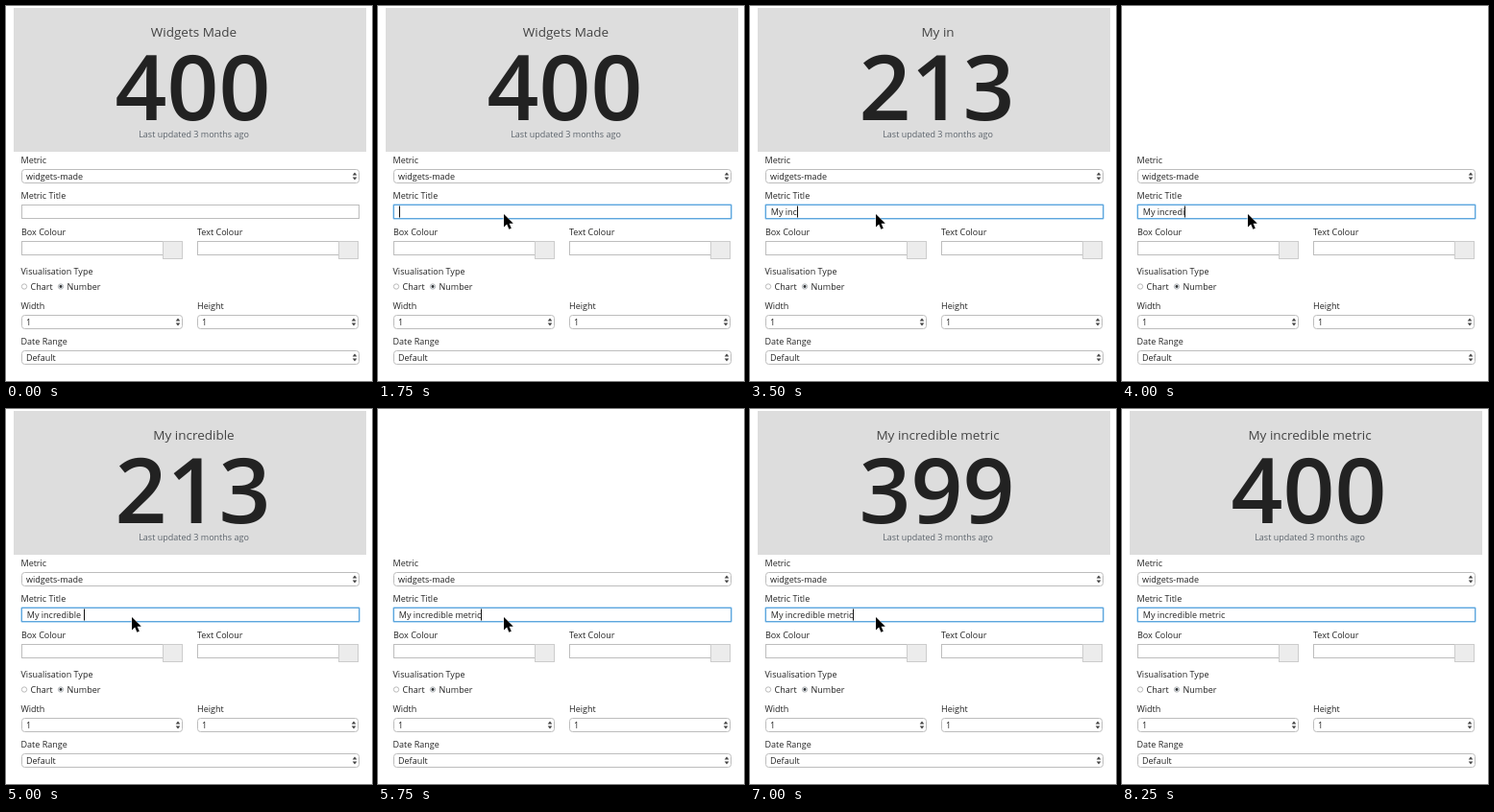
Write an HTML page that moves like this. It is 381 by 391 pixels and loops after 8.5 s.

```html
<!DOCTYPE html>
<html lang="en">
<head>
<meta charset="utf-8">
<title>Metric widget editor</title>
<style>
  html, body { margin: 0; width: 100%; height: 100%; overflow: hidden; background: #fff; }
  svg { display: block; width: 381px; height: 391px; }
  text { font: 9px "Open Sans", "Noto Sans", sans-serif; fill: #222; white-space: pre; }
  .mid { text-anchor: middle; }
  #title { font-size: 13.5px; fill: #444; }
  #count { font-size: 94.5px; font-weight: 600; fill: #222; }
  #updated { fill: #5c646c; }
  .box { fill: #fff; stroke: #bdbdbd; }
  .swatch { fill: #ececec; stroke: #ccc; }
  .arrows { fill: #444; }
</style>
</head>
<body>
<svg viewBox="0 0 381 391">
  <g id="panel">
    <rect x="8" y="2" width="367" height="150" fill="#ddd"/>
    <text id="title" class="mid" x="195.5" y="32"></text>
    <text id="count" class="mid" x="194.5" y="118.5"></text>
    <text id="updated" class="mid" x="195.5" y="137">Last updated 3 months ago</text>
  </g>
  <g id="form"></g>
  <g id="focus" fill="none">
    <rect x="15.5" y="206.5" width="353" height="16" rx="1.5" stroke="#b9dcf5"/>
    <rect x="16.5" y="207.5" width="351" height="14" stroke="#5ea5dc"/>
  </g>
  <text id="typed" x="21.8" y="218"></text>
  <rect id="caret" y="208.5" width="1" height="12" fill="#111"/>
  <path id="pointer" d="M0 0V13.5L3.2 10.6L5.4 15.8L7.8 14.8L5.6 9.7H9.8Z" fill="#000" stroke="#fff" stroke-width="1" paint-order="stroke"/>
</svg>
<script>
const LOOP = 8500, TICK = 250;
const PHRASE = "My incredible metric";
const $ = id => document.getElementById(id);

const label = (x, y, s) => `<text x="${x}" y="${y}">${s}</text>`;
const box = (x, y, w, h, r = 0) =>
  `<rect class="box" x="${x + .5}" y="${y + .5}" width="${w - 1}" height="${h - 1}" rx="${r}"/>`;
const select = (x, y, w, s) => box(x, y, w, 15, 3) + label(x + 5, y + 11, s) +
  `<path class="arrows" transform="translate(${x + w - 5} ${y + 7.5})" d="M-2.3-1L0-4L2.3-1ZM-2.3 1L0 4L2.3 1Z"/>`;
const colour = (x, s) => label(x, 239, s) + box(x, 245, 148, 15) +
  `<rect class="swatch" x="${x + 147.5}" y="245.5" width="20" height="18"/>`;
const radio = (x, s, on) =>
  `<circle cx="${x}" cy="292.5" r="2.7" fill="${on ? "#e4ecf4" : "#fff"}" stroke="#aaa" stroke-width=".8"/>` +
  (on ? `<circle cx="${x}" cy="292.5" r="1.4" fill="#333"/>` : "") + label(x + 6.5, 296, s);

$("form").innerHTML = [
  label(15.5, 164, "Metric"), select(16, 170, 352, "widgets-made"),
  label(15.5, 201, "Metric Title"), box(16, 207, 352, 15),
  colour(16, "Box Colour"), colour(199, "Text Colour"),
  label(15.5, 280, "Visualisation Type"), radio(19, "Chart", false), radio(57, "Number", true),
  label(15.5, 316, "Width"), select(16, 322, 168, "1"),
  label(199, 316, "Height"), select(199, 322, 168, "1"),
  label(15.5, 353, "Date Range"), select(16, 359, 352, "Default")
].join("");

// Typing bursts: start time, first length, last length, characters per tick
const bursts = [[2000, 1, 5, 1], [3500, 6, 13, 2], [5000, 14, 20, 2]];
// Panel renders: shown from, until, title, whether the number counts up
const renders = [
  [0, 3000, "Widgets Made", false],
  [3500, 4000, "My in", true],
  [5000, 5750, "My incredible", true],
  [6250, LOOP, PHRASE, true]
];
const route = [[500, 350, 242], [750, 262, 243], [1000, 172, 240], [1250, 142, 228], [1500, 131, 217]];

const show = (id, on) => $(id).setAttribute("visibility", on ? "visible" : "hidden");

function typedLength(t) {
  let n = 0;
  for (const [start, first, last, rate] of bursts)
    if (t >= start) n = Math.min(last, first + rate * Math.floor((t - start) / TICK));
  return n;
}

function countUp(ms) {
  return Math.round(400 * (1 - 2 ** (-Math.min(ms + 110, 1000) / 100)));
}

function draw(time) {
  const t = Math.floor(time % LOOP / TICK) * TICK;

  const view = renders.find(([from, to]) => t >= from && t < to);
  $("panel").style.display = view ? "" : "none";
  if (view) {
    $("title").textContent = view[2];
    $("count").textContent = view[3] ? countUp(t - view[0]) : 400;
  }

  $("typed").textContent = PHRASE.slice(0, typedLength(t));
  const width = typedLength(t) ? $("typed").getComputedTextLength() : 0;
  $("caret").setAttribute("x", Math.round(22 + width));
  const blinkOff = t >= 6250 && Math.floor((t - 6250) / 500) % 2 === 0;
  show("caret", t >= 1500 && !blinkOff);
  show("focus", t >= 1500);

  const spot = route.filter(([at]) => t >= at).pop();
  show("pointer", spot && t < 7500);
  if (spot) $("pointer").setAttribute("transform", `translate(${spot[1]} ${spot[2]})`);
}

const begin = performance.now();
function frame() {
  draw(performance.now() - begin);
  requestAnimationFrame(frame);
}
frame();
</script>
</body>
</html>
```
